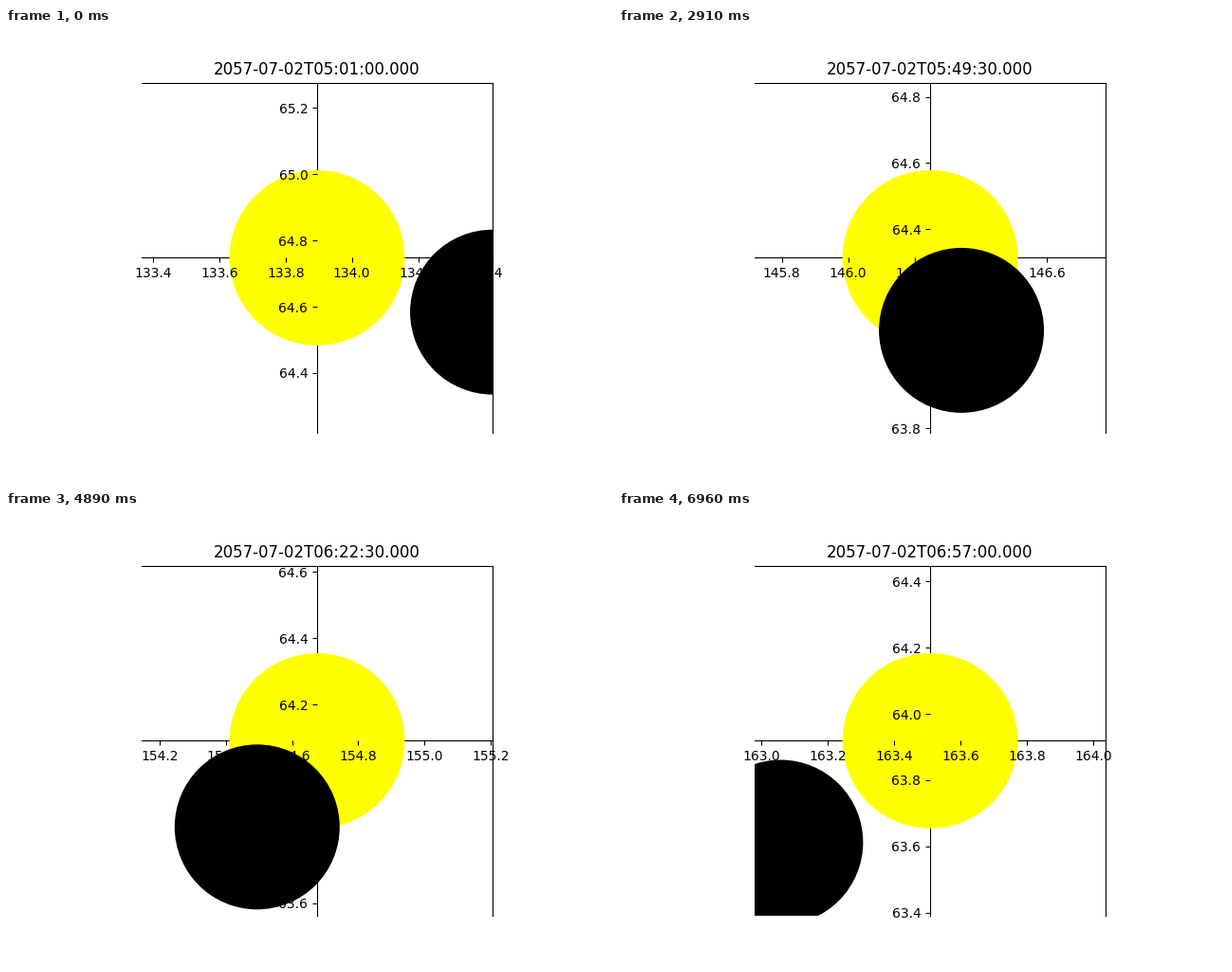
These frames come from a looping animation (640x480 px, 6990 ms). A matplotlib script:

```python
import matplotlib.pyplot as plt
import numpy as np
from matplotlib.animation import FuncAnimation

FRAMES = 233
SCALE = 349.5          # pixels per degree
SUN_R = 0.2644
MOON_R = 87 / SCALE
START = 5 * 3600 + 60  # seconds after midnight
STEP = 30


def track(values):
    """Smooth quadratic path through a few key positions."""
    keys = [0, 36, 97, 137, 163, 203, 232]
    return np.poly1d(np.polyfit(keys, values, 2))


sun_az = track([133.896, 138.473, 146.2475, 151.353, 154.6755, 159.795, 163.507])
sun_alt = track([64.746, 64.5745, 64.3145, 64.172, 64.0887, 63.983, 63.920])
# Moon position relative to the sun, in pixels
moon_dx = track([185, 127.3, 33.2, -26, -63.5, -118.5, -157.7])
moon_dy = track([-57.3, -64.1, -76.6, -85.1, -91.1, -99.9, -107.3])

fig, ax = plt.subplots(figsize=(6.4, 4.8), dpi=100)
ax.set_aspect("equal")
for side in ("left", "bottom"):
    ax.spines[side].set_position("center")
for spine in ax.spines.values():
    spine.set_zorder(0.9)

sun = ax.add_patch(plt.Circle((0, 0), SUN_R, fc="yellow", ec="none", zorder=1))
moon = ax.add_patch(plt.Circle((0, 0), MOON_R, fc="black", ec="none", zorder=3))
title = ax.set_title("", y=1.0)


def clock(i):
    h, rest = divmod(START + STEP * i, 3600)
    m, s = divmod(rest, 60)
    return f"2057-07-02T{h:02d}:{m:02d}:{s:02d}.000"


def update(i):
    x, y = sun_az(i), sun_alt(i)
    sun.center = x, y
    moon.center = x + moon_dx(i) / SCALE, y + moon_dy(i) / SCALE
    ax.set_xlim(x - 2 * SUN_R, x + 2 * SUN_R)
    ax.set_ylim(y - 2 * SUN_R, y + 2 * SUN_R)
    title.set_text(clock(i))
    return sun, moon, title


anim = FuncAnimation(fig, update, frames=FRAMES, interval=30,
                     repeat=True, repeat_delay=0, blit=False)
plt.show()
```
